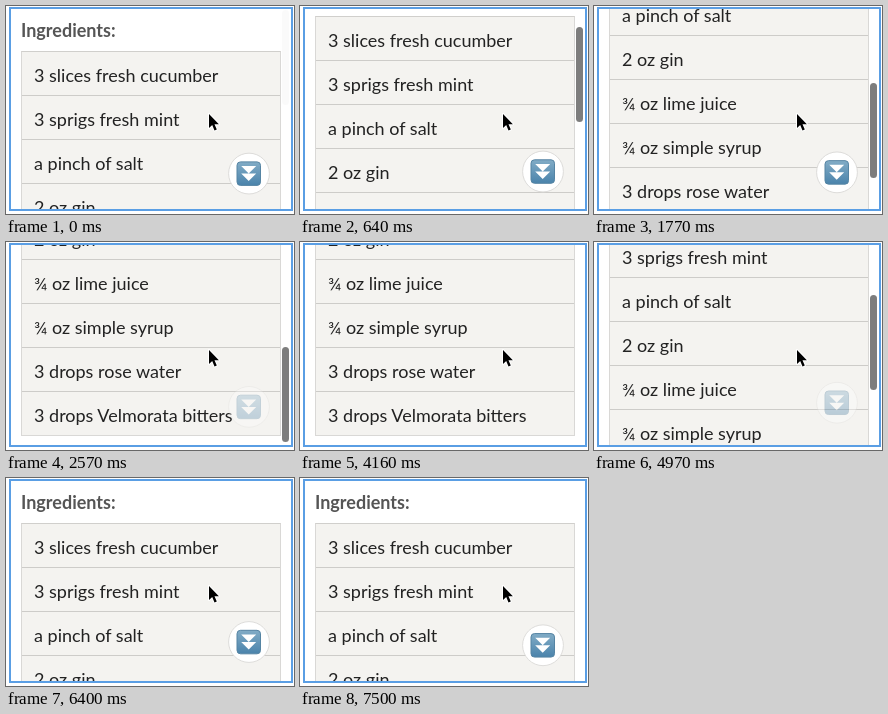
Animation of 288x208 px, one loop 7.53 s. Source, as an HTML page:

```html
<!DOCTYPE html>
<html lang="en">
<head>
<meta charset="utf-8">
<title>Ingredients</title>
<style>
  html, body { margin: 0; width: 100%; height: 100%; overflow: hidden; background: #fff; }
  body { position: relative; font: 18px/43px Lato, sans-serif; color: #222; }
  .box {
    position: absolute; left: 3px; top: 1px; width: 280px; height: 200px;
    border: 2px solid #5a9ee4; overflow: hidden;
  }
  .content { position: absolute; left: 10px; top: 0; width: 260px; }
  h1 { margin: 0; height: 42px; font-size: 18px; line-height: 43px; font-weight: 700; color: #555; white-space: nowrap; }
  ul {
    margin: 0; padding: 0; list-style: none; box-sizing: border-box;
    border: 1px solid #d9d8d6; border-top-color: #d0cfcc; background: #f4f3f0;
  }
  li { height: 43px; padding-left: 12px; border-bottom: 1px solid #cdccc9; white-space: nowrap; line-height: 46px; }
  li:last-child { border-bottom: 0; }
  .bar {
    position: absolute; left: 271px; top: 1px; width: 7px; height: 95px;
    border-radius: 4px; background: #7d7d7d; opacity: 0;
  }
  .button { position: absolute; left: 217px; top: 141px; width: 42px; height: 42px; }
  svg { position: absolute; overflow: visible; }
  .cursor { left: 203px; top: 108px; }
</style>
</head>
<body>
<div class="box">
  <div class="content">
    <h1>Ingredients:</h1>
    <ul></ul>
  </div>
  <div class="bar"></div>
  <div class="button">
    <svg width="42" height="42" viewBox="-21 -21 42 42">
      <defs>
        <linearGradient id="blue" x2="0" y2="1">
          <stop offset="0" stop-color="#82acc6"/>
          <stop offset="1" stop-color="#4a83ab"/>
        </linearGradient>
      </defs>
      <circle r="20.4" fill="#fff" stroke="#dddcda"/>
      <rect x="-12" y="-11.7" width="23.5" height="23.5" rx="3.5" fill="url(#blue)" stroke="#5584a3"/>
      <path d="M-7.8-7.5h15L-.3 0zM-7.8 0h15L-.3 7.5z" fill="#fff"/>
    </svg>
  </div>
</div>
<svg class="cursor" width="12" height="18">
  <path d="M0 0V14L3.2 11.1 5.5 16.5 7.8 15.5 5.5 10.2H9.9Z" fill="#000" stroke="#fff" stroke-width="2" stroke-linejoin="round" paint-order="stroke"/>
</svg>
<script>
  const LOOP = 7530, MAX = 204;
  const DOWN = { start: 20, end: 2224, power: 1.39 };
  const UP = { start: 4189, end: 5708, power: 1 };
  const BOB = LOOP / 4, BOB_TOP = 6820;

  const items = [
    '3 slices fresh cucumber', '3 sprigs fresh mint', 'a pinch of salt', '2 oz gin',
    '¾ oz lime juice', '¾ oz simple syrup', '3 drops rose water', '3 drops Velmorata bitters'
  ];
  const $ = s => document.querySelector(s);
  for (const text of items) {
    const li = document.createElement('li');
    li.textContent = text;
    $('ul').append(li);
  }
  const content = $('.content'), bar = $('.bar'), button = $('.button');

  // 0 to 1 between two times
  const ramp = (t, from, to) => Math.min(1, Math.max(0, (t - from) / (to - from)));
  const travel = (t, { start, end, power }) => ramp(t, start, end) ** power;
  // The scrollbar lingers after a move, then fades
  const barFade = (t, { start, end }) =>
    ramp(t, start - 20, start + 10) - ramp(t, end + 400, end + 650);
  const shift = (el, y) => { el.style.transform = `translateY(${y}px)`; };

  function draw(t) {
    const scroll = Math.floor(MAX * (travel(t, DOWN) - travel(t, UP)));
    shift(content, -scroll);
    shift(bar, Math.round(scroll * 0.495));
    bar.style.opacity = barFade(t, DOWN) + barFade(t, UP);

    shift(button, -0.3 - 4 * Math.cos(2 * Math.PI * (t - BOB_TOP) / BOB));
    button.style.opacity = 1 - ramp(t, DOWN.end, DOWN.end + 500) + ramp(t, 4800, 5300);
  }

  const begin = performance.now();
  function tick() {
    draw((performance.now() - begin) % LOOP);
    requestAnimationFrame(tick);
  }
  tick();
</script>
</body>
</html>
```
